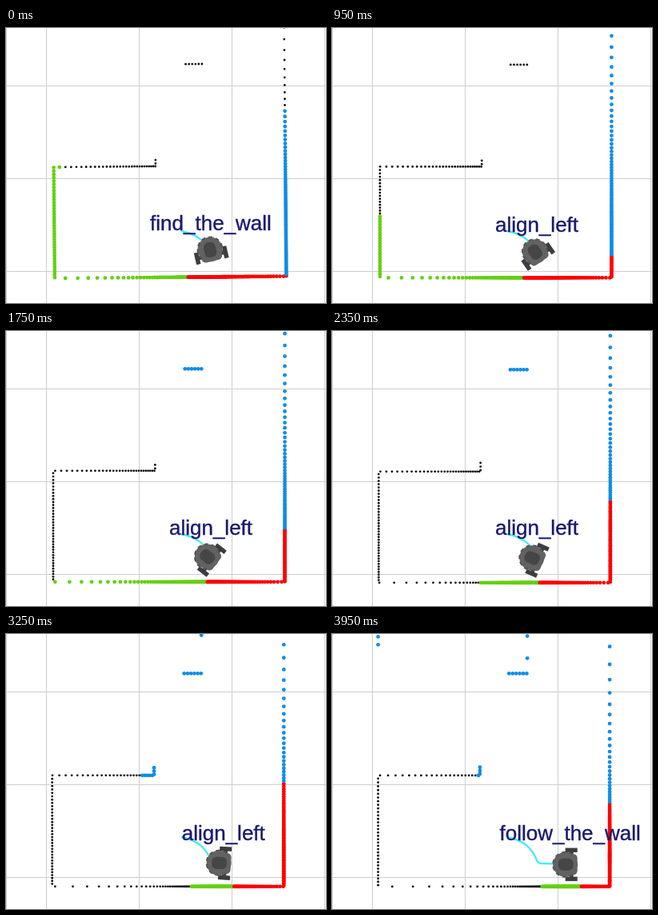
These frames come from a looping animation (400x344 px, 4000 ms). An HTML page with a canvas:

```html
<!DOCTYPE html>
<html lang="en">
<head>
<meta charset="utf-8">
<title>Wall following robot</title>
<style>
  html, body { margin: 0; width: 100%; height: 100%; overflow: hidden; background: #fff; }
  canvas { display: block; }
</style>
</head>
<body>
<canvas id="stage" width="400" height="344"></canvas>
<script>
const ctx = document.getElementById('stage').getContext('2d');
const LOOP = 4000, STEP = 50, GRID = 116, RAD = Math.PI / 180;
const RED = '#ff0000', GREEN = '#66cf14', BLUE = '#118de6', BLACK = '#0a0a0a';

// Scan heading at a few times: wait, turn steadily, settle
const turnKeys = [[0, -74], [400, -73], [2350, -18.5], [3250, -3.6], [LOOP, -0.3]];
const labels = [[0, 'find_the_wall'], [200, 'align_left'], [3500, 'follow_the_wall']];

// Axis-aligned walls: x1, y1, x2, y2
const LEFT = 58, RIGHT = 347.5, TOP = 177, BOTTOM = 316, FAR = -600;
const walls = [
  [LEFT, FAR, LEFT, BOTTOM],
  [LEFT, BOTTOM, RIGHT, BOTTOM],
  [RIGHT, FAR, RIGHT, BOTTOM],
  [LEFT, TOP, 185.3, TOP],
  [185.3, 165, 185.3, TOP],
  [220.5, 49.5, 244.5, 49.5],
  [244.5, FAR, 244.5, 49.5]
];

const trail = new Path2D('M219 254 C240 258 250 268 256 283 Q257 287 262 287 L300 288');

const clamp = v => Math.min(1, Math.max(0, v));

function scanHeading(t) {
  const i = turnKeys.findIndex(k => k[0] > t);
  const [t0, a] = turnKeys[i - 1], [t1, b] = turnKeys[i];
  return a + (b - a) * (t - t0) / (t1 - t0);
}

// Distance to the nearest wall along the direction (ux, uy)
function castRay(x, y, ux, uy) {
  let best = Infinity;
  for (const [x1, y1, x2, y2] of walls) {
    const upright = x1 === x2;
    const d = upright ? (x1 - x) / ux : (y1 - y) / uy;
    const across = upright ? y + d * uy : x + d * ux;
    const [lo, hi] = upright ? [y1, y2] : [x1, x2];
    if (d > 0 && d < best && across >= lo && across <= hi) best = d;
  }
  return best;
}

function sectorColor(deg) {
  if (Math.abs(deg) <= 54.5) return RED;
  if (Math.abs(deg) <= 135) return deg > 0 ? BLUE : GREEN;
  return BLACK;
}

function drawGrid() {
  ctx.fillStyle = '#cecece';
  ctx.fillRect(0, 0, 1, 344);
  for (let x = 50; x < 400; x += GRID) ctx.fillRect(x, 0, 1, 344);
  for (let y = 72; y < 344; y += GRID) ctx.fillRect(0, y, 400, 1);
}

function drawScan(x, y, heading, shiftX, shiftY, tilt) {
  ctx.save();
  ctx.translate(x, y);
  ctx.rotate(-tilt * RAD);
  for (let deg = -180; deg < 180; deg++) {
    const a = (heading + deg) * RAD, ux = Math.cos(a), uy = -Math.sin(a);
    const d = castRay(x - shiftX, y - shiftY, ux, uy);
    if (d === Infinity) continue;
    const color = sectorColor(deg);
    ctx.fillStyle = color;
    ctx.beginPath();
    ctx.arc(d * ux, d * uy, color === BLACK ? 1.4 : 2.4, 0, 7);
    ctx.fill();
  }
  ctx.restore();
}

function drawTrail(robotX) {
  ctx.save();
  ctx.beginPath();
  ctx.rect(0, 0, robotX, 344);
  ctx.clip();
  ctx.strokeStyle = '#45ecf7';
  ctx.lineWidth = 2.4;
  ctx.stroke(trail);
  ctx.restore();
}

function drawRobot(x, y, heading) {
  ctx.save();
  ctx.translate(x, y);
  ctx.rotate(-heading * RAD);
  ctx.fillStyle = '#3c3c42';
  for (const side of [-18, 18]) ctx.fillRect(0, side - 2.75, 15, 5.5);
  ctx.fillRect(5, -17, 5, 34);
  ctx.fillStyle = '#626262';
  ctx.beginPath();
  ctx.arc(0, 0, 15.5, 0, 7);
  ctx.roundRect(0, -13, 15, 26, 5);
  ctx.fill();
  ctx.strokeStyle = '#555';
  ctx.lineWidth = 2;
  ctx.setLineDash([5, 4]);
  ctx.beginPath();
  ctx.arc(0, 0, 15.5, 0.9, 5.4);
  ctx.stroke();
  ctx.fillStyle = '#464646';
  ctx.beginPath();
  ctx.roundRect(-9, -7.5, 19, 15, 6);
  ctx.fill();
  ctx.restore();
}

function drawLabel(t, x, y) {
  const text = labels.filter(([from]) => from <= t).pop()[1];
  ctx.font = '26px "Liberation Sans", Arial, sans-serif';
  ctx.textAlign = 'center';
  ctx.fillStyle = ctx.strokeStyle = '#1b1a70';
  ctx.lineWidth = 0.4;
  ctx.fillText(text, x, y);
  ctx.strokeText(text, x, y);
}

function draw(now) {
  const t = Math.floor(now % LOOP / STEP) * STEP;
  const scan = scanHeading(t);
  const turn = -scan / 74;                          // 1 before the turn, 0 after it
  const drive = Math.max(0, t - 2770) * 0.037;      // forward travel after the turn
  const x = 248 + 7 * turn + drive, y = 277 + 11.5 * t / LOOP;

  ctx.fillStyle = '#fff';
  ctx.fillRect(0, 0, 400, 344);
  drawGrid();
  drawTrail(x);
  drawScan(x, y - 0.8, scan, 3 * turn - 0.4, -4.6 * turn, 0.5 * (1 - clamp(t / 400)));
  drawRobot(x, y, -77 * (1 - clamp(t / 3400)));
  drawLabel(t, Math.max(256, 254 + drive), 253 + 2 * clamp(t / 200) + 2.5 * clamp(drive / 17));
}

const start = performance.now();
function frame() {
  draw(performance.now() - start);
  requestAnimationFrame(frame);
}
frame();
</script>
</body>
</html>
```
